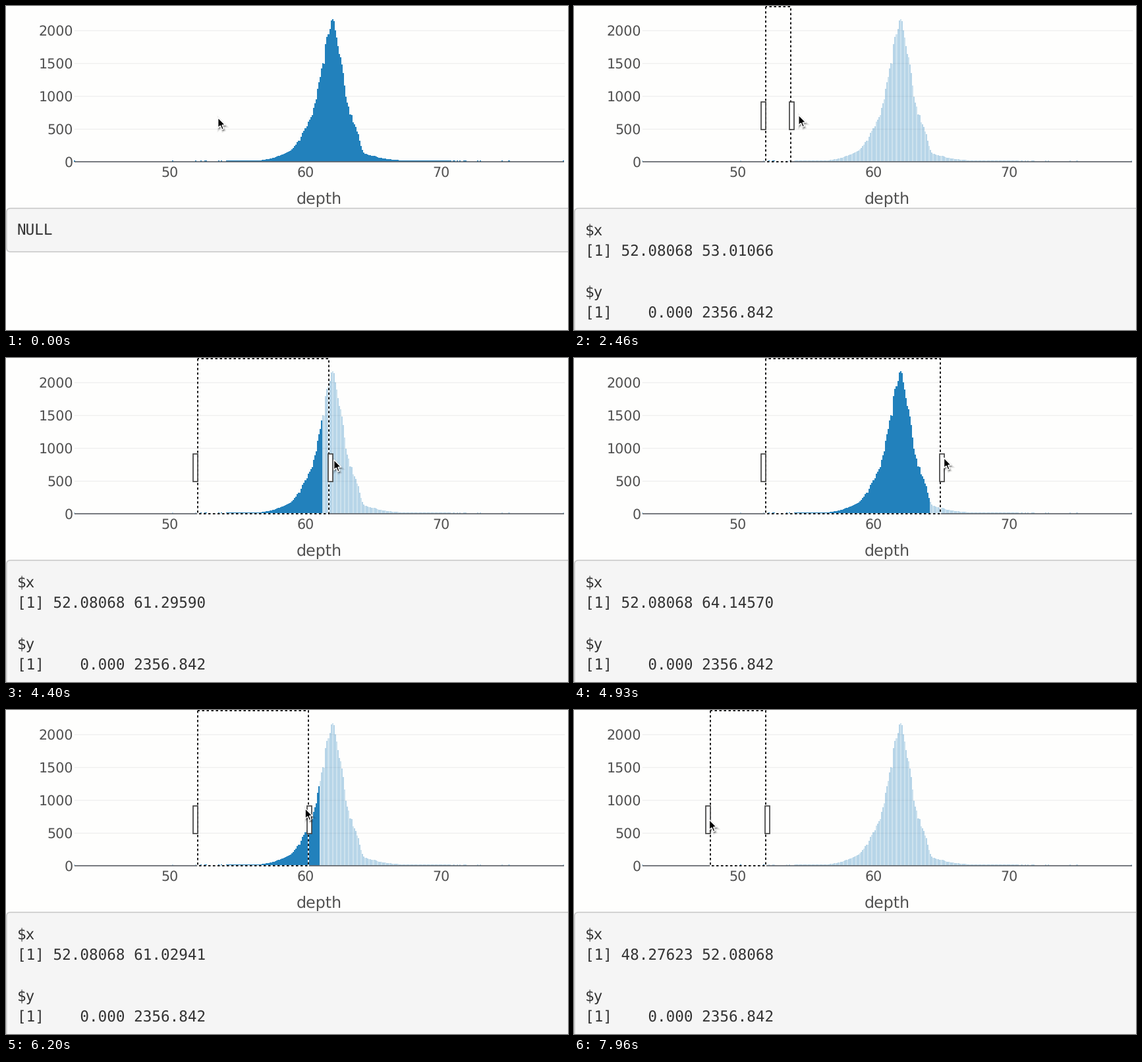
Recreate the animation shown at these times as a matplotlib script. Size 853 by 493 pixels, loop 8000 ms.

```python
import numpy as np
import matplotlib.pyplot as plt
from matplotlib.animation import FuncAnimation
from matplotlib.collections import PolyCollection
from matplotlib.patches import FancyBboxPatch, Polygon, Rectangle

W, H, DPI = 853, 493, 64
STEP, FRAMES = 40, 200
PT = 72 / DPI  # points per pixel

BLUE = (34 / 255, 129 / 255, 188 / 255)
ANCHOR = 52.08068
DRAG_START = 2260
EDGE_LAG = 35
TOP, BASE = 1.2, 236.8

# Turning points of the pointer: time in ms -> depth under its tip
SWEEP = {
    60: 53.52, 260: 52.4, 1500: 52.4, 1930: ANCHOR, DRAG_START: ANCHOR,
    2360: 53.01066, 2450: 54.45, 3260: 58.08326, 3370: 58.45,
    4130: 61.2959, 4330: 61.2959, 4410: 62.06, 5360: 67.72119, 5450: 67.98,
    5960: 61.75, 6300: 59.3, 6700: 61.04227, 6960: 61.04227, 7050: 59.27,
    7500: 52.2, 7860: 48.27623, 7970: 47.87,
}
# Time in ms -> height of the tip in pixels
DRIFT = {60: 169, 260: 172, 1930: 168, 2460: 165, 5460: 148, 7060: 150, 7960: 166}
# Outline of the distribution: depth -> count
SHAPE = {
    56.5: 20, 57: 33, 57.5: 50, 58: 82, 59: 190, 60: 515, 60.5: 705, 61: 1206,
    61.6: 1850, 62: 2235, 62.4: 1800, 62.8: 1330, 63.1: 880, 63.5: 630,
    63.9: 430, 64.3: 130, 65: 85, 66: 42, 67: 20,
}


def along(points, x):
    return np.interp(x, list(points), list(points.values()))


def px(depth):
    return 248.5 + (depth - 50) * 20.6


def py(count):
    return BASE - count * 0.1


def histogram():
    """Jittered outline, thinning out to single bars far from the body."""
    rng = np.random.default_rng(4)
    depths = np.round(np.arange(43, 79.05, 0.1), 1)
    logs = {d: np.log(n) for d, n in SHAPE.items()}
    counts = np.exp(along(logs, depths)) * rng.normal(1, 0.025, len(depths))
    gap = np.maximum(np.maximum(54.8 - depths, depths - 70.2), 0)
    keep = rng.random(len(depths)) < np.exp(-gap / 1.5)
    keep[[0, -1]] = True
    return depths[keep], np.maximum(counts, 20)[keep]


plt.rcParams["text.hinting"] = "none"
fig = plt.figure(figsize=(W / DPI, H / DPI), dpi=DPI, facecolor="#fefefd")
ax = fig.add_axes([0, 0, 1, 1])
ax.set_xlim(0, W)
ax.set_ylim(H, 0)
ax.axis("off")


def label(x, y, s, size, ha="left", font="DejaVu Sans", color="#505050"):
    return ax.text(x, y, s, fontsize=size * PT, ha=ha, va="baseline",
                   family=font, color=color, zorder=4)


def patch(p):
    ax.add_patch(p)
    return p


# Axes and bars
for n in range(0, 2001, 500):
    label(102.2, py(n) + 7.5, str(n), 20.6, "right")
    if n:
        ax.plot([104, 847], [py(n)] * 2, color="#efefef", lw=1.3 * PT, zorder=1)
for d in (50, 60, 70):
    label(px(d), 259.6, str(d), 20.6, "center")
label(475.3, 301, "depth", 23.8, "center")

depths, counts = histogram()
bars = PolyCollection(
    [[(px(d - .05), BASE), (px(d - .05), py(n)), (px(d + .05), py(n)), (px(d + .05), BASE)]
     for d, n in zip(depths, counts)],
    linewidths=0, antialiaseds=False, zorder=2)
ax.add_collection(bars)
ax.plot([104, 847], [237, 237], color="#60646a", lw=1.7 * PT, zorder=3,
        solid_capstyle="butt")

full = np.tile((*BLUE, 1.0), (len(depths), 1))
dim = full.copy()
stripe = np.round(depths * 10).astype(int) % 3 == 620 % 3
dim[:, 3] = np.where(stripe, 0.22, 0.32)

# Output panel
panel = patch(FancyBboxPatch((0.8, 307.8), 880, 66.2, fc="#f5f5f5", ec="#cccccc",
                             lw=1.7 * PT, boxstyle="round,pad=0,rounding_size=6",
                             zorder=3))
lines = [label(16.7, 349 + 31.3 * i, "", 22.6, font="DejaVu Sans Mono", color="#333333")
         for i in range(5)]

# Selection box (dashes over white) with its two handles
box = [patch(Polygon(np.zeros((4, 2)), fill=False, ec=color, lw=1.75 * PT, ls=ls, zorder=5))
       for color, ls in (("white", "-"), ("black", (0, (2, 2))))]
grips = [patch(Rectangle((0, 146), 7, 41.5, fc="white", ec="#444444", lw=1.7 * PT,
                         zorder=7)) for _ in range(2)]

# Pointer and its soft shadow
ARROW = np.array([(0, 0), (0, 15.6), (3.6, 12.3), (6.1, 18.2), (8.7, 17.1),
                  (6.3, 11.4), (11, 11.2)]) + (0.7, 0.8)
shadows = [patch(Polygon(ARROW, fc="black", ec="black", lw=w * PT, alpha=a, zorder=8))
           for w, a in ((0.5, 0.16), (2.5, 0.1), (4.5, 0.06))]
arrow = patch(Polygon(ARROW, fc="black", ec="white", lw=1.4 * PT, zorder=9))


def move_pointer(t):
    tip = ARROW + (px(along(SWEEP, t)), along(DRIFT, t))
    arrow.set_xy(tip)
    for s in shadows:
        s.set_xy(tip + (1.2, 2.2))


def move_selection(t):
    shown = t >= DRAG_START + EDGE_LAG
    for p in box + grips:
        p.set_visible(shown)
    left, right = sorted((px(ANCHOR), px(along(SWEEP, t - EDGE_LAG))))
    for p in box:
        p.set_xy([(left, TOP), (left, BASE), (right, BASE), (right, TOP)])
    grips[0].set_x(left - 7)
    grips[1].set_x(right - 1.5)


def report(t):
    # The readout refreshes ten times a second and trails the pointer
    sampled = (t - 50) // 100 * 100 - 40
    if sampled < DRAG_START:
        bars.set_facecolor(full)
        panel.set_height(66.2)
        rows = ["NULL", "", "", "", ""]
    else:
        lo, hi = sorted((ANCHOR, along(SWEEP, sampled)))
        inside = (depths >= lo) & (depths <= hi)
        bars.set_facecolor(np.where(inside[:, None], full, dim))
        panel.set_height(240)
        rows = ["$x", f"[1] {lo:.5f} {hi:.5f}", "", "$y", "[1]    0.000 2356.842"]
    for line, row in zip(lines, rows):
        line.set_text(row.replace("$", r"\$"))


def draw(frame):
    t = frame * STEP + 10
    move_pointer(t)
    move_selection(t)
    report(t)
    return []


anim = FuncAnimation(fig, draw, frames=FRAMES, interval=STEP, repeat=True,
                     repeat_delay=0, blit=False)
plt.show()
```
